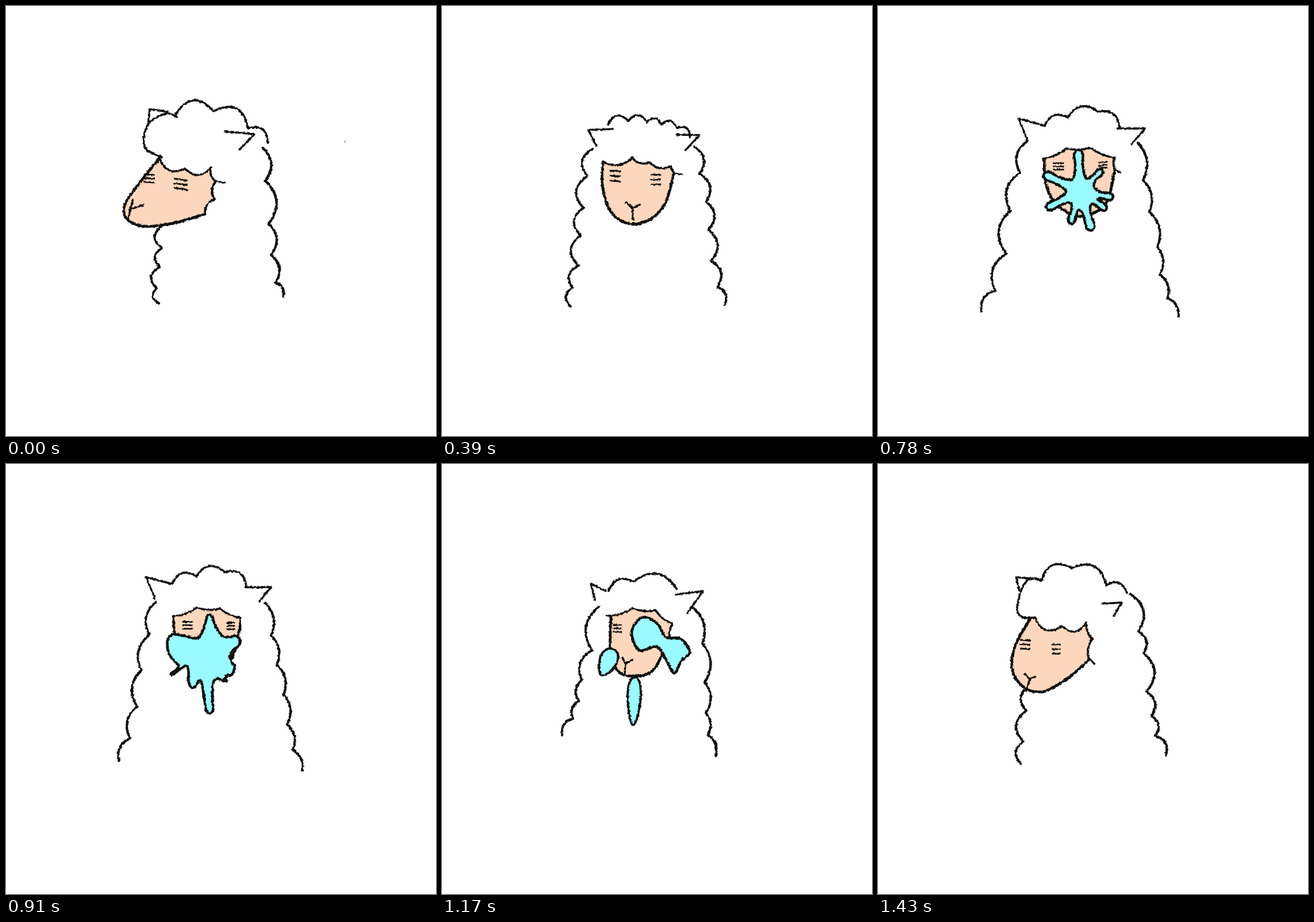
Write an HTML page that moves like this. It is 748 by 748 pixels and loops after 1.56 s.

```html
<!DOCTYPE html>
<html lang="en">
<head>
<meta charset="utf-8">
<title>Alpaca</title>
<style>
html, body { margin: 0; width: 100%; height: 100%; overflow: hidden; background: #fefefe; }
svg { display: block; width: 100%; height: 100%; }
path { stroke-linecap: round; stroke-linejoin: round; }
</style>
</head>
<body>
<svg viewBox="0 0 748 748">
  <filter id="pencil" filterUnits="userSpaceOnUse" x="0" y="0" width="748" height="748" color-interpolation-filters="sRGB">
    <feTurbulence type="fractalNoise" baseFrequency="0.25" numOctaves="2" seed="4"/>
    <feDisplacementMap in="SourceGraphic" scale="4" xChannelSelector="R" yChannelSelector="G"/>
  </filter>
  <g id="stage" filter="url(#pencil)" fill="none" stroke="#111"></g>
</svg>
<script>
const STEP = 130;
const SKIN = '#fdd7bd', GOO = '#99faff';

const points = text => text.split(' ').map(p => p.split(',').map(Number));
const line = text => ({ pts: points(text) });
// Curls between corner points; the bulge is a share of each curl's length.
const wool = (bulge, text) => ({ pts: points(text), bulge });
const shape = pts => ({ pts });
// Each eye: x, y, width, gap between its three dashes, slant.
const eyes = (left, right) => ({ pts: [left, right] });

// Splat with one finger for each [angle in degrees, length].
function splat(x, y, fingers) {
  const pts = [];
  const add = (deg, r, side = 0) => {
    const a = deg * Math.PI / 180, c = Math.cos(a), s = Math.sin(a);
    pts.push([x + c * r - s * side, y + s * r + c * side]);
  };
  fingers.forEach(([deg, len], i) => {
    const next = i + 1 < fingers.length ? fingers[i + 1][0] : fingers[0][0] + 360;
    const half = len * 0.115;
    for (const [along, side] of [[0.6, -0.8], [0.9, -0.9], [1, 0], [0.9, 0.9], [0.6, 0.8]]) {
      add(deg, len * along, half * side);
    }
    add((deg + next) / 2, Math.max(25, 52 - 0.55 * (next - deg)));
  });
  return pts;
}

// Hanging drip, traced from right to left.
const drip = (x, top, bottom, w) => [
  [x + w, top], [x + w * 0.7, bottom - w], [x, bottom], [x - w * 0.7, bottom - w], [x - w, top]
];

// Teardrop, narrower below, tilted clockwise.
function drop(x, y, rx, ry, deg) {
  const t = deg * Math.PI / 180;
  return Array.from({ length: 10 }, (_, i) => {
    const a = i * Math.PI / 5;
    const u = rx * Math.sin(a) * (1 + 0.3 * Math.cos(a)), v = -ry * Math.cos(a);
    return [x + u * Math.cos(t) - v * Math.sin(t), y + u * Math.sin(t) + v * Math.cos(t)];
  });
}

const turned = {
  left: wool(-0.34, '270,384 272,421 268,454 262,491 266,517'),
  right: wool(0.22, '447,247 451,304 457,379 461,433 469,481 482,506'),
  top: wool(0.33, '295,189 361,183 421,213 455,238'),
  puff: line('297,193 278,187 247,206 241,245 271,263'),
  earL: line('247,207 250,179 281,184'),
  earR: line('381,218 432,223 407,249'),
  fringe: wool(-0.27, '267,265 311,283 357,280'),
  side: wool(-0.18, '357,280 365,305 363,336 346,362'),
  face: line('267,265 232,308 207,345 210,370 240,383 290,378 346,362'),
  tuft: line('365,305 380,307'),
  nose: line('221,337 216,354 239,346 213,370'),
  eyes: eyes([249, 300, 17, 6.5, 1], [304, 310, 21, 8, 3]),
  dust: line('589,236 589.5,236')
};
const quarter = {
  left: wool(-0.3, '262,248 257,296 254,352 251,393 251,447 239,480 241,517'),
  right: wool(0.28, '445,245 442,283 459,328 451,413 470,478 489,511'),
  top: wool(0.33, '283,212 326,201 364,206 391,214 421,220 444,243'),
  puff: line('280,209 258,217 262,247'),
  earL: line('272,250 260,224 299,228'),
  earR: line('399,242 441,241 414,268'),
  fringe: wool(-0.24, '274,276 325,281 355,293 394,296'),
  side: wool(0, '394,296 395,299'),
  face: line('274,276 270,330 283,385 315,406 352,393 378,356 395,299'),
  tuft: line('395,301 411,302'),
  nose: line('304,369 315,380 327,375 315,403'),
  eyes: eyes([293, 314, 15, 11, 1], [355, 323, 17, 10, 0])
};
const front = {
  left: wool(-0.28, '264,248 246,306 234,373 228,438 216,494 206,528'),
  right: wool(0.23, '434,245 453,307 466,368 472,408 479,452 485,494 494,530'),
  top: wool(0.37, '295,200 341,198 380,198 419,215'),
  earL: line('265,237 249,207 295,200'),
  earR: line('417,206 455,208 433,234'),
  fringe: wool(-0.12, '286,266 337,247 368,251 402,262'),
  side: wool(-0.1, '402,262 411,281'),
  face: line('287,266 288,297 308,340 350,360 396,340 412,281'),
  tuft: line('411,281 425,284'),
  nose: line('336,314 348,324 361,316 349,340'),
  lip: line('338,352 349,339 361,352'),
  eyes: eyes([310, 277.5, 20, 6.5, 1], [389, 281, 15, 6.5, 0])
};
const spit = {
  ...front,
  left: wool(-0.22, '260,235 247,290 230,356 223,431 204,495 180,532'),
  right: wool(0.17, '452,238 461,303 472,358 486,419 490,467 504,508 523,540'),
  top: wool(0.27, '290,208 330,194 383,184 420,210'),
  earL: line('260,234 245,196 290,208'),
  earR: line('417,213 465,213 441,240'),
  fringe: wool(-0.06, '287,266 328,248 370,247 411,264'),
  side: wool(-0.1, '411,264 412,284'),
  face: line('289,266 292,310 312,347 353,366 396,344 412,284'),
  tuft: line('412,284 422,290'),
  eyes: eyes([314, 279, 17, 5.5, 0], [391, 277, 14, 5, -2]),
  goo: shape(splat(352, 322, [
    [-93, 72], [-44, 53], [11, 58], [35, 55], [74, 71], [107, 59], [153, 66], [205, 70]
  ]))
};
const dripping = {
  left: wool(-0.18, '261,246 250,319 235,389 231,449 213,500'),
  right: wool(0.17, '450,245 461,293 470,341 480,383 488,438 494,487 507,526'),
  top: wool(0.3, '289,207 332,197 378,192 416,215'),
  earL: line('258,234 243,198 284,208'),
  earR: line('416,216 457,215 441,237'),
  fringe: wool(-0.08, '294,264 335,252 375,256 404,271'),
  side: wool(0, '404,271 403,280'),
  face: line('294,264 298,300 315,345 345,358 385,340 403,280'),
  nose: front.nose,
  eyes: eyes([317, 282, 14, 6.5, 0], [391, 286.5, 11, 6, 1]),
  goo: shape([
    ...points('350,275 365,267 371,304 388,299 405,306 422,317 422,338 404,350 400,372 385,378'),
    ...drip(375, 398, 412, 8), ...drip(340, 405, 479, 11),
    ...points('322,396 311,402 302,376 294,358'), ...drip(278, 372, 386, 6),
    ...points('274,318 290,298 332,303')
  ]),
  drop: shape(drop(309, 243, 7.5, 14, -14))
};
const clearing = {
  left: wool(-0.22, '273,248 261,324 243,376 238,412 228,443 209,471'),
  right: wool(0.18, '434,248 453,312 457,380 459,433 462,471 476,507'),
  top: wool(0.27, '290,220 333,205 408,217'),
  earL: line('266,236 259,208 285,221'),
  earR: line('407,227 454,221 427,259'),
  fringe: wool(-0.08, '286,264 331,251 371,254 401,278'),
  side: wool(-0.1, '401,278 396,302'),
  face: line('294,264 293,325 306,360 332,369 368,358 396,302'),
  nose: line('314,337 319,347 331,341 318,364'),
  eyes: eyes([305, 286, 13, 6, 0], [354, 290, 13, 6, 0]),
  goo: shape(points('330,292 348,267 374,277 389,301 415,304 431,327 416,343 404,364 391,343 374,318 343,324')),
  drop: shape(drop(288, 345, 14.5, 25, 24)),
  streak: shape(drop(334, 412, 11, 42, 2))
};
const returning = {
  left: wool(-0.28, '262,387 258,429 253,483 248,521'),
  right: wool(0.25, '438,226 453,291 462,329 467,396 476,438 482,473 501,506'),
  top: wool(0.3, '284,203 337,181 397,211 433,224'),
  puff: line('284,202 263,200 249,220 242,254 252,267 273,267'),
  earL: line('246,220 240,197 286,201'),
  earR: line('390,243 424,241 410,264'),
  fringe: wool(-0.3, '273,267 320,282 362,276'),
  side: wool(-0.12, '362,276 373,304 367,340'),
  face: line('265,268 238,318 234,360 256,390 290,395 335,369 367,340'),
  tuft: line('367,338 376,347'),
  nose: line('255,365 264,374 273,370 258,394'),
  eyes: eyes([256, 314, 16, 7.5, 1], [310, 322, 13, 8, 0])
};

const lerp = (a, b, t) => a + (b - a) * t;
const blend = (p, q, t) => p.map((v, k) => lerp(v, q[k], t));

function pointAt(pts, u) {
  const k = u * (pts.length - 1), j = Math.min(Math.floor(k), pts.length - 2);
  return blend(pts[j], pts[j + 1], k - j);
}

function mixPart(a, b, t) {
  const n = Math.max(a.pts.length, b.pts.length);
  const pts = Array.from({ length: n }, (_, i) =>
    blend(pointAt(a.pts, i / (n - 1)), pointAt(b.pts, i / (n - 1)), t));
  return { pts, bulge: lerp(a.bulge, b.bulge, t) };
}

// In-between pose; a part that only one pose has is kept unless omitted.
function mix(a, b, t, omit = []) {
  const pose = {};
  for (const name of Object.keys({ ...a, ...b })) {
    if (omit.includes(name)) continue;
    pose[name] = a[name] && b[name] ? mixPart(a[name], b[name], t) : a[name] || b[name];
  }
  return pose;
}

const straight = pts => 'M' + pts.map(p => p.join(' ')).join('L');

function curls({ pts, bulge }, start = 'M') {
  return pts.slice(1).reduce((d, [x, y], i) => {
    const [px, py] = pts[i];
    const cx = (px + x) / 2 + (y - py) * bulge * 2, cy = (py + y) / 2 - (x - px) * bulge * 2;
    return d + `Q${cx} ${cy} ${x} ${y}`;
  }, start + pts[0].join(' '));
}

// Smooth curve through all points.
function smooth(pts, closed = false, start = 'M') {
  const n = pts.length;
  const at = i => closed ? pts[(i + n) % n] : pts[Math.max(0, Math.min(n - 1, i))];
  const handle = (p, from, to) => p.map((v, k) => v + (to[k] - from[k]) / 6).join(' ');
  let d = start + pts[0].join(' ');
  for (let i = 0; i < (closed ? n : n - 1); i++) {
    d += `C${handle(at(i), at(i - 1), at(i + 1))} ${handle(at(i + 1), at(i + 2), at(i))} ${at(i + 1).join(' ')}`;
  }
  return closed ? d + 'Z' : d;
}

const dashes = ([x, y, w, gap, slant]) => [-1, 0, 1].map(row =>
  straight([[x - w / 2, y + row * gap - slant / 2], [x + w / 2, y + row * gap + slant / 2]])).join('');

const asCurls = part => curls(part);
const asLine = part => straight(part.pts);
const asCurve = part => smooth(part.pts);
const asBlob = part => smooth(part.pts, true);
const asEyes = part => part.pts.map(dashes).join('');
const asNose = ({ pts: [l, m, r, end] }) => straight([l, m, r]) + straight([m, end]);
const asSkin = (_, pose) => curls(pose.fringe) + curls(pose.side, 'L') +
  smooth(pose.face.pts.slice().reverse(), false, 'L') + 'Z';

// Layers from back to front: name, drawing rule, line width, fill.
const layers = [
  ['left', asCurls, 4], ['skin', asSkin, 0, SKIN], ['top', asCurls, 3.8],
  ['puff', asCurve, 3.8], ['right', asCurls, 4.2], ['earL', asLine, 3.6],
  ['earR', asLine, 3.6], ['fringe', asCurls, 3.5], ['side', asCurls, 3.8],
  ['face', asCurve, 4.8], ['tuft', asLine, 3.2], ['nose', asNose, 3.4],
  ['lip', asLine, 3.4], ['eyes', asEyes, 2.9], ['goo', asBlob, 4.6, GOO],
  ['drop', asBlob, 4, GOO], ['streak', asBlob, 4, GOO], ['dust', asLine, 2]
].map(([name, rule, width, fill]) => {
  const el = document.createElementNS('http://www.w3.org/2000/svg', 'path');
  if (width) el.setAttribute('stroke-width', width);
  else el.setAttribute('stroke', 'none');
  if (fill) el.setAttribute('fill', fill);
  if (name === 'dust') el.setAttribute('stroke', '#888');
  document.getElementById('stage').append(el);
  return { name, rule, el };
});

const wet = ['goo', 'drop', 'streak'];
const cycle = [
  turned, mix(turned, quarter, 0.5, ['dust']),
  quarter, mix(quarter, front, 0.5, ['puff', 'lip']),
  front, mix(front, spit, 0.8, wet),
  spit, mix(spit, dripping, 0.5, ['drop', 'lip', 'tuft']),
  dripping, clearing, mix(clearing, returning, 0.5, wet), returning
];

let shown = -1;
function draw(time) {
  const i = Math.floor(time / STEP) % cycle.length;
  if (i === shown) return;
  shown = i;
  const pose = cycle[i];
  for (const { name, rule, el } of layers) {
    el.setAttribute('d', pose[name] || name === 'skin' ? rule(pose[name], pose) : '');
  }
}

function tick() {
  draw(performance.now());
  requestAnimationFrame(tick);
}
draw(0);
requestAnimationFrame(tick);
</script>
</body>
</html>
```
